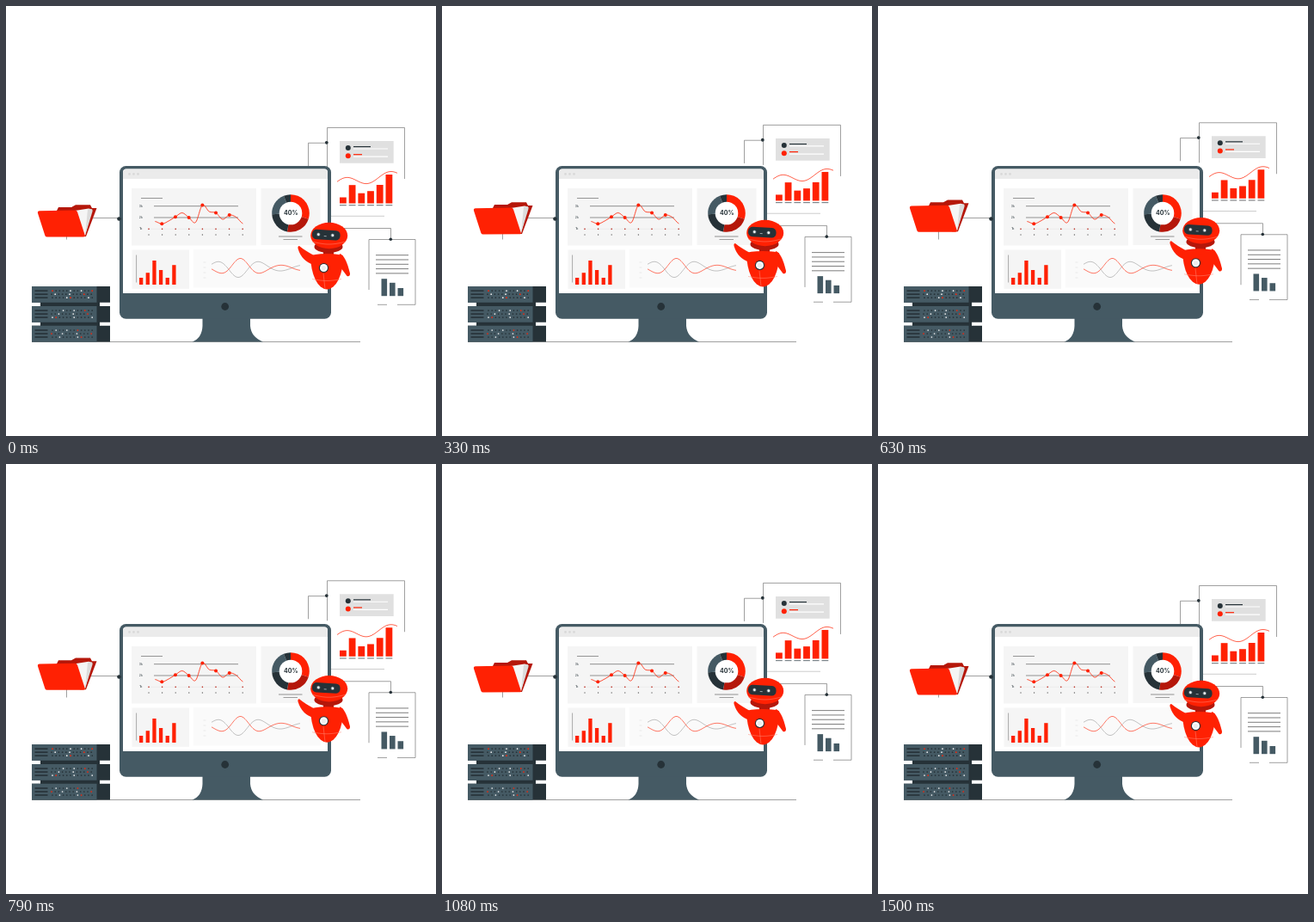
Write an HTML page with a canvas that moves like this. It is 500x500 px and loops after 1.54 s.

```html
<!DOCTYPE html>
<html lang="en">
<head>
<meta charset="utf-8">
<title>Data dashboard</title>
<style>
  html, body { margin: 0; width: 100%; height: 100%; overflow: hidden; background: #fff; }
  canvas { display: block; width: 500px; height: 500px; }
</style>
</head>
<body>
<canvas id="stage"></canvas>
<script>
const canvas = document.getElementById('stage');
const ctx = canvas.getContext('2d');
const ratio = window.devicePixelRatio || 1;
canvas.width = canvas.height = 500 * ratio;

const RED = '#ff2103', DEEP = '#b5170a', SLATE = '#455a64', DARK = '#263238';
const PANEL = '#f5f5f5', GREY = '#e0e0e0', WHITE = '#fff', SEAM = '#ff8a78';
const WIRE = '#777', TAU = Math.PI * 2;
const LOOP = 1540, FRAMES_PER_10MS = 0.24;
const CYCLE = 36, LIFT = 6.9;

const range = (n, draw) => Array.from({ length: n }, (_, i) => draw(i));

function box(x1, y1, x2, y2, color, radius = 0) {
  ctx.fillStyle = color;
  ctx.beginPath();
  ctx.roundRect(x1, y1, x2 - x1, y2 - y1, radius);
  ctx.fill();
}

function oval(x, y, rx, ry, color, from = 0, to = TAU) {
  ctx.fillStyle = color;
  ctx.beginPath();
  ctx.ellipse(x, y, rx, ry, 0, from, to);
  ctx.fill();
}

const dot = (x, y, r, color) => oval(x, y, r, r, color);

function line(points, color = WIRE, width = 0.7) {
  ctx.strokeStyle = color;
  ctx.lineWidth = width;
  ctx.beginPath();
  points.forEach(([x, y]) => ctx.lineTo(x, y));
  ctx.stroke();
}

function rule(x1, x2, y, color, width) {
  line([[x1, y], [x2, y]], color, width);
}

function plot(x1, x2, f, color, width) {
  line(range(x2 - x1 + 1, i => [x1 + i, f(x1 + i)]), color, width);
}

function shape(path, color) {
  ctx.fillStyle = color;
  ctx.fill(new Path2D(path));
}

// Catmull-Rom curve through evenly spaced heights.
function spline(x, step, ys, color, width) {
  const at = i => ys[Math.max(0, Math.min(ys.length - 1, i))];
  ctx.strokeStyle = color;
  ctx.lineWidth = width;
  ctx.beginPath();
  ctx.moveTo(x, ys[0]);
  for (let i = 0; i < ys.length - 1; i++) {
    const left = x + i * step;
    ctx.bezierCurveTo(
      left + step / 3, at(i) + (at(i + 1) - at(i - 1)) / 6,
      left + step * 2 / 3, at(i + 1) - (at(i + 2) - at(i)) / 6,
      left + step, at(i + 1));
  }
  ctx.stroke();
}

function bars(x, step, width, base, heights, color) {
  heights.forEach((h, i) => box(x + i * step, base - h, x + i * step + width, base, color));
}

function label(text, x, y, size, weight = 400) {
  ctx.fillStyle = DARK;
  ctx.font = `${weight} ${size}px Inter, sans-serif`;
  ctx.textAlign = 'center';
  ctx.textBaseline = 'middle';
  ctx.fillText(text, x, y);
}

function lifted(dy, draw) {
  ctx.save();
  ctx.translate(0, -dy);
  draw();
  ctx.restore();
}

function drawServers() {
  box(40, 340, 109, 380, DARK);
  range(3, unit => {
    const y = 326 + unit * 22.9;
    box(30, y, 121, y + 18.8, DARK);
    box(30, y, 105.5, y + 18.8, SLATE);
    range(3, row => {
      const rowY = y + 5.2 + row * 4;
      rule(33.5, 48.5, rowY, DARK, 1.6);
      range(12, col => {
        const pick = (col * 7 + row * 5 + unit * 3 + col * row) % 11;
        const color = pick === 0 ? RED : pick < 3 ? '#f0f0f0' : DARK;
        dot(54 + col * 4.2 - (row % 2), rowY, 0.85, color);
      });
    });
  });
}

function drawFolder() {
  shape('M58 240 L61 234 L76 234 L81 231.3 L98 231.3 L100 235 L105.5 235 L93 268 L86 268 Z', DEEP);
  shape('M80 238 L96 235.5 Q99 235.5 99 238 L92 267 L88 267 Z', '#f5f5f5');
  shape('M95 236.5 L99 236 Q101 236 100.5 239 L92 267 Z', '#dcdcdc');
  shape('M39 238.3 L80 237.6 Q82.4 237.6 83 239.5 L91.7 266.2 Q92.2 268.4 90 268.4 L48 268.6 Q46 268.6 45.4 267 L37 241 Q36.4 238.5 39 238.3 Z', RED);
}

function drawReport() {
  line([[351.5, 186], [351.5, 159.3], [371, 159.3]]);
  line([[373.5, 188], [373.5, 141.5], [463.5, 141.5], [463.5, 201]]);
  rule(376, 440, 244.3, '#999', 0.5);
  dot(372.8, 158.8, 1.9, DARK);
  box(388, 157, 450.7, 182.8, GREY);
  [DARK, RED].forEach((color, i) => {
    const y = 163.6 + i * 9.1;
    dot(397.8, y + 1.5, 3, color);
    rule(404, 424 - i * 10, y, color, 1.2);
    rule(404, 444, y + 2.4, WHITE, 1.2);
  });
  bars(388, 10.7, 7.8, 229.5, [7, 21.3, 11.8, 14.3, 21.5, 33.5], RED);
  range(6, i => rule(388 + i * 10.7, 395.8 + i * 10.7, 231.7, DARK, 0.7));
  plot(385, 455, x => 204.7 - 0.135 * (x - 395) - 5.2 * Math.cos((x - 395) / 51 * TAU), RED, 0.7);
}

function drawNote() {
  line([[378, 258.5], [447.5, 258.5], [447.5, 271]]);
  line([[422, 330], [422, 271.5], [476, 271.5], [476, 347.3], [455, 347.3]]);
  rule(432, 443, 347.3);
  dot(447.3, 271.2, 1.8, DARK);
  range(5, i => rule(430, 468, 289.7 + i * 5.3, '#444', 0.7));
  bars(436.5, 9.5, 6.6, 337.2, [20, 15.4, 9.2], SLATE);
}

function drawLineChart() {
  box(146, 212, 291, 278.5, PANEL);
  rule(157, 182, 223.5, '#555', 0.6);
  range(3, i => label(`${3 - i}k`, 156.8, 233 + i * 13.2, 3.4));
  rule(172, 270, 232.7, '#666', 0.7);
  rule(172, 270, 246, '#666', 0.7);
  rule(166, 275, 259.3, '#ddd', 0.4);
  range(8, i => {
    dot(166 + i * 15.6, 259.3, 0.8, DEEP);
    dot(166 + i * 15.6, 266, 0.7, '#666');
  });
  const heights = [250.5, 253.3, 250, 245.2, 240.5, 246, 251.5, 231.5, 239, 240.5, 248, 243, 245.5, 253];
  spline(173.4, 7.85, heights, RED, 0.8);
  heights.forEach((y, i) => {
    if (i % 2 && i < 12) dot(173.4 + i * 7.85, y, 2, RED);
  });
}

function drawDonut() {
  box(296.5, 212, 365.5, 278, PANEL);
  let angle = -TAU / 4;
  [[RED, 0.3], [DEEP, 0.23], [DARK, 0.21], [SLATE, 0.2], [DARK, 0.06]].forEach(([color, share]) => {
    ctx.fillStyle = color;
    ctx.beginPath();
    ctx.moveTo(331, 241);
    ctx.arc(331, 241, 21.8, angle, angle += share * TAU);
    ctx.fill();
  });
  dot(331, 241, 13.3, WHITE);
  label('40%', 331.3, 241, 7, 700);
  rule(317, 344.5, 268, '#666', 0.7);
  rule(322.5, 339, 271.5);
}

function drawBarChart() {
  box(146.5, 283.5, 213, 328.7, PANEL);
  line([[151.6, 289.5], [151.6, 321.5]], WIRE, 0.6);
  bars(155, 7.65, 4.3, 324, [8, 13.8, 28, 17, 8, 22.8], RED);
}

function drawWaves() {
  box(218, 283, 366, 327.5, '#fafafa');
  range(4, i => rule(229.5, 232.5, 298 + i * 6, '#ddd', 0.6));
  const wave = (peak, period, spread, sign) => x =>
    304.5 + sign * (3 + 8 * Math.exp(-(((x - peak) / spread) ** 2))) * Math.cos((x - peak) / period * TAU);
  plot(239, 342, wave(270, 50, 30, 1), '#888', 0.5);
  plot(239, 342, wave(272.5, 48, 24, -1), RED, 0.6);
}

function drawMonitor() {
  shape('M228.5 362 V372 Q228 386 216.5 390.5 H299 Q285 385 284 372 V362 Z', SLATE);
  box(132, 186, 378, 363.8, SLATE, 7.5);
  box(136, 189.5, 374, 334, WHITE, [4, 4, 0, 0]);
  box(136, 189.5, 374, 201, '#ebebeb', [4, 4, 0, 0]);
  range(3, i => dot(143.5 + i * 5, 195.4, 1.3, '#d8d8d8'));
  dot(254.7, 349.5, 4.4, DARK);
  drawLineChart();
  drawDonut();
  drawBarChart();
  drawWaves();
}

function drawRobot() {
  // Arms and body
  shape('M341 279 Q347 284 358 290 V301 Q344 297 339.5 282 Q339 279 341 279 Z', RED);
  shape('M388 288 Q395 290 400 311 Q400 315 396.5 314 L386 300 Z', RED);
  oval(375, 280, 16.5, 7, DEEP);
  box(369, 283, 381, 291, DEEP);
  oval(373.2, 291, 19, 38.5, RED, 0, Math.PI);
  oval(373.2, 291, 19, 3, RED);
  plot(356, 390, x => 317.5 + 2 * Math.sin((x - 356) / 34 * Math.PI), SEAM, 0.5);
  line([[369, 311], [371, 329]], SEAM, 0.5);

  // Head
  oval(375.7, 267, 21.5, 15.2, RED);
  plot(356, 395, x => 274 + 3 * Math.sin((x - 356) / 39 * Math.PI), SEAM, 0.5);
  ctx.save();
  ctx.translate(372.3, 266.2);
  ctx.rotate(0.06);
  box(-16.3, -5.7, 16.3, 5.7, DARK, 5);
  [-9, 7.5].forEach(x => {
    dot(x, 0, 2.2, '#65757d');
    dot(x, 0, 1.3, WHITE);
  });
  rule(-2.5, 0.5, 1.5, '#b5bec2', 0.8);
  ctx.restore();

  // Badge
  dot(369.5, 304.5, 5.6, DARK);
  dot(369.5, 304.5, 4.5, WHITE);
  dot(369.5, 304.5, 2.6, '#eee');
}

function render(time) {
  // The pose advances 24 times a second, on ticks of 10 ms.
  const tick = Math.floor((time % LOOP) / 10);
  const step = Math.ceil((tick + 0.5) * FRAMES_PER_10MS) - 1;
  const phase = ((step + 1) % CYCLE) / (CYCLE / 2);
  const dy = LIFT * (1 - Math.abs(1 - phase)) - LIFT / 18;

  ctx.setTransform(ratio, 0, 0, ratio, 0, 0);
  ctx.fillStyle = WHITE;
  ctx.fillRect(0, 0, 500, 500);

  rule(30, 412, 390.5);
  drawServers();
  line([[70.5, 255], [70.5, 271.5]]);
  rule(90, 131, 246.5);
  lifted(dy, drawFolder);
  lifted(dy, drawReport);
  lifted(dy, drawNote);
  drawMonitor();
  dot(131.5, 247.5, 2.3, DARK);
  lifted(dy, drawRobot);
}

const start = performance.now();
function loop() {
  render(performance.now() - start);
  requestAnimationFrame(loop);
}
loop();
</script>
</body>
</html>
```
